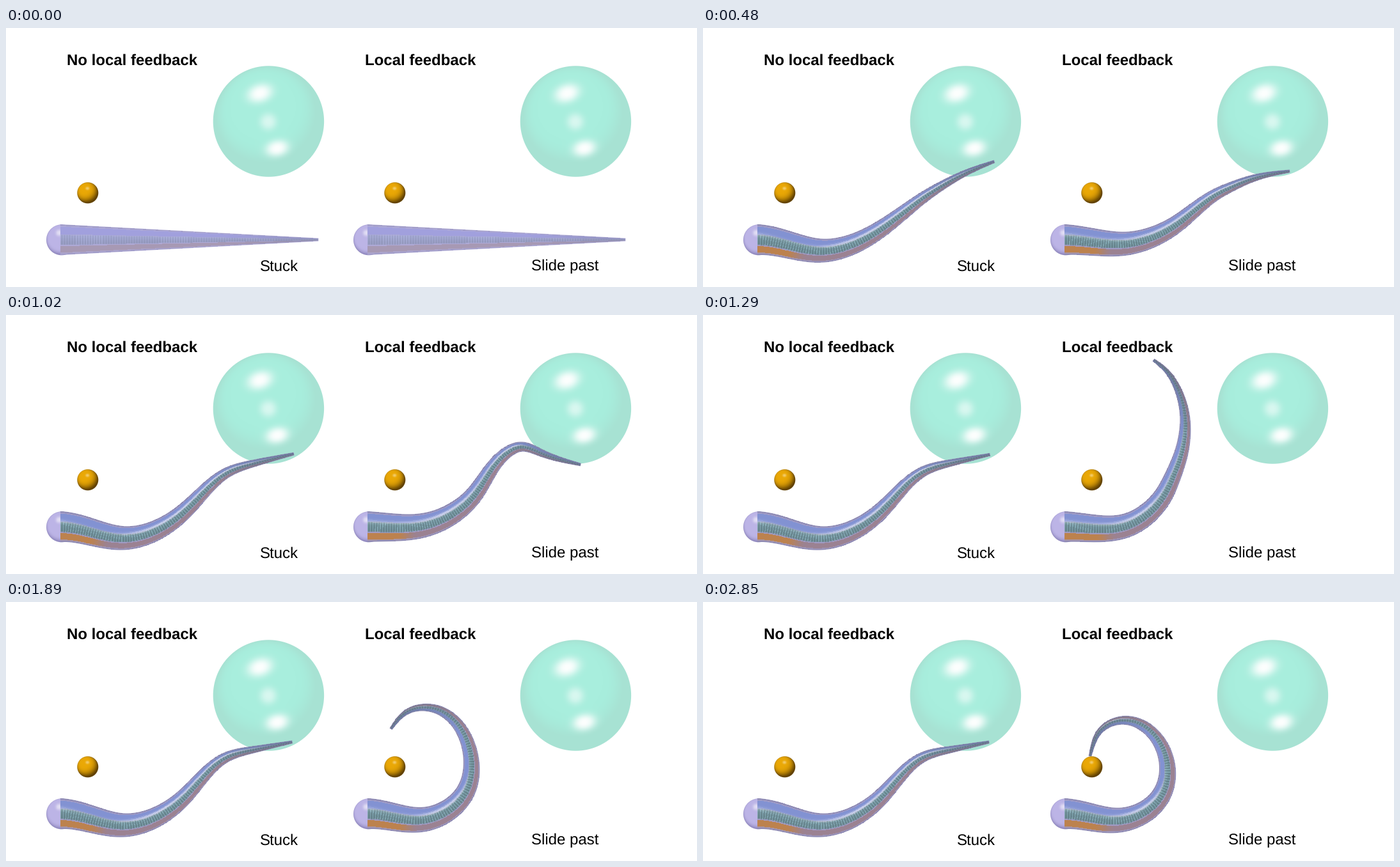
Animation of 1080x405 px, one loop 2.91 s. Source, as a matplotlib script:

```python
import numpy as np
import matplotlib.pyplot as plt
from matplotlib.animation import FuncAnimation

plt.rcParams["text.hinting"] = "none"

W, H, DPI = 1080, 405, 100
FRAMES, STEP = 97, 30
LAST = 79
PANEL = 480          # distance between the two panels
N, M = 300, 28       # cells along and across an arm
R_BASE, R_TIP = 23.7, 2
ROOT = (85, 331)
SETTLE = 10          # time constant of the slow approach

# a few points of the centre line at key steps; every arm starts at ROOT
STRAIGHT = [(290, 331), (488, 331)]
STUCK = {
    0: STRAIGHT,
    8: [(182, 347), (300, 308), (365, 270), (415, 236), (461, 214)],
    LAST: [(182, 349), (275, 308), (345, 242), (385, 231), (447, 219)],
}
SLIDE = {
    0: STRAIGHT,
    8: [(172, 343), (290, 305), (350, 268), (385, 248), (429, 229)],
    18: [(175, 331), (258, 294), (318, 239), (350, 228), (441, 231)],
    28: [(172, 329), (250, 283), (298, 219), (325, 206), (355, 215), (418, 234)],
    30: [(185, 322), (265, 240), (330, 125), (352, 75)],
    43: [(175, 338), (240, 290), (251, 240), (221, 149), (168, 127), (144, 134)],
    LAST: [(172, 341), (233, 307), (246, 266), (213, 197), (176, 185),
           (142, 200), (125, 241)],
}


def spline(p, count):
    """Cubic spline through p, level at the root and free at the tip."""
    u = np.r_[0, np.cumsum(np.hypot(*np.diff(p, axis=0).T))]
    h = np.diff(u)
    d = np.diff(p, axis=0) / h[:, None]
    k = len(u)
    a, b = np.eye(k), np.zeros((k, 2))
    a[0, :2] = 2 * h[0], h[0]
    b[0] = 6 * (d[0] - (1, 0))
    for i in range(1, k - 1):
        a[i, i - 1:i + 2] = h[i - 1], 2 * (h[i - 1] + h[i]), h[i]
        b[i] = 6 * (d[i] - d[i - 1])
    m = np.linalg.solve(a, b)
    x = np.linspace(0, u[-1], count)
    j = np.clip(np.searchsorted(u, x, "right") - 1, 0, k - 2)
    g = h[j][:, None]
    lo, hi = (u[j + 1] - x)[:, None], (x - u[j])[:, None]
    return ((m[j] * lo**3 + m[j + 1] * hi**3) / (6 * g)
            + (p[j] / g - m[j] * g / 6) * lo
            + (p[j + 1] / g - m[j + 1] * g / 6) * hi)


def encode(pts):
    """Pose as the angle of every segment, followed by the length."""
    c = spline(np.array([ROOT] + pts, float), 1200)
    s = np.r_[0, np.cumsum(np.hypot(*np.diff(c, axis=0).T))]
    q = np.linspace(0, s[-1], N + 1)
    x, y = np.interp(q, s, c[:, 0]), np.interp(q, s, c[:, 1])
    return np.r_[np.unwrap(np.arctan2(np.diff(y), np.diff(x))), s[-1]]


class Motion:
    """Monotone cubic between key poses, in a time that slows after settle."""

    def __init__(self, poses, settle):
        self.settle = settle
        self.k = np.array([self.warp(t) for t in poses])
        self.v = np.array([encode(p) for p in poses.values()])
        d = np.diff(self.v, axis=0) / np.diff(self.k)[:, None]
        a, b = d[:-1], d[1:]
        same = a * b > 0
        mid = np.where(same, 2 * a * b / np.where(same, a + b, 1), 0)
        self.m = np.vstack([d[:1], mid, d[-1:]])

    def warp(self, t):
        late = max(t - self.settle, 0)
        return min(t, self.settle) + SETTLE * (1 - np.exp(-late / SETTLE))

    def at(self, t):
        k, v, m = self.k, self.v, self.m
        t = self.warp(t)
        j = min(np.searchsorted(k, t, "right") - 1, len(k) - 2)
        h = k[j + 1] - k[j]
        u = (t - k[j]) / h
        e = u * u * (3 - 2 * u)
        return (v[j] * (1 - e) + v[j + 1] * e
                + h * u * (1 - u) * (m[j] * (1 - u) - m[j + 1] * u))


def rgb(*c):
    return np.array(c) / 255


def mix(a, b, w):
    w = np.asarray(w)[..., None]
    return a * (1 - w) + b * w


def smooth(x, a, b):
    u = np.clip((x - a) / (b - a), 0, 1)
    return u * u * (3 - 2 * u)


def window(x, a, b, soft=.08):
    return smooth(x, a - soft / 2, a + soft / 2) * (1 - smooth(x, b - soft / 2, b + soft / 2))


# s runs from root to tip, v from the lower side (-1) to the upper side (1)
s = ((np.arange(N) + .5) / N)[:, None] * np.ones((1, M))
v = np.ones((N, 1)) * ((np.arange(M) + .5) / M * 2 - 1)
ring = np.cos(2 * np.pi * (np.arange(N) % 3) / 3)[:, None]


def skin(body, upper, core, lower, tip, depth):
    """Clear tube with three muscles inside, the middle one ringed."""
    col = mix(body, upper, window(v, .36, .86))
    col = mix(col, lower, window(v, -.88, -.42))
    ribs = core * (1 + .13 * v + depth * ring)[..., None]
    col = mix(col, ribs, window(v, -.34, .32))
    col = mix(col, body * .88, smooth(np.abs(v), .88, 1))
    return np.clip(mix(col, tip, .65 * smooth(s, .6, 1)), 0, 1)


rest_col = skin(rgb(174, 170, 216), rgb(161, 160, 221), rgb(156, 161, 200),
                rgb(167, 153, 180), rgb(140, 142, 178), .05)
flex = mix(rgb(155, 130, 146), rgb(188, 130, 78), 1 - smooth(s, .12, .2))
flex_col = skin(rgb(160, 156, 200), rgb(130, 146, 210), rgb(114, 146, 156),
                flex, rgb(96, 108, 132), .14)


def gloss(angle):
    """Light from the upper left, as a streak along the lit side."""
    facing = np.cos(-angle - np.radians(35))[:, None]
    return .6 * facing**4 * np.exp(-((v - .42 * facing) / .13)**2) * (1 - smooth(s, .75, 1))


fig = plt.figure(figsize=(W / DPI, H / DPI), dpi=DPI, facecolor="white")
ax = fig.add_axes([0, 0, 1, 1])
ax.set_xlim(0, W)
ax.set_ylim(H, 0)
ax.axis("off")


def ball(cx, cy, r, light, dark, lit, span, glints, z):
    """Shaded ball; glints are (dx, dy, rx, ry, turn, strength)."""
    h = int(r) + 3
    left, top = int(cx) - h, int(cy) - h
    c = np.arange(2 * h) + .5
    x, y = np.meshgrid(c + left - cx, c + top - cy)
    d = np.hypot(x, y)
    nz = np.sqrt(np.clip(1 - (d / r)**2, 0, 1))
    lam = (x * lit[0] + y * lit[1]) / r + nz * lit[2]
    col = mix(rgb(*dark), rgb(*light), smooth(lam, *span))
    for dx, dy, rx, ry, turn, amount in glints:
        a = np.radians(turn)
        p = (x - dx) * np.cos(a) + (y - dy) * np.sin(a)
        q = (y - dy) * np.cos(a) - (x - dx) * np.sin(a)
        col = mix(col, np.ones(3), amount * np.exp(-np.hypot(p / rx, q / ry)**2.6))
    ax.imshow(np.dstack([col, np.clip(r - d + .5, 0, 1)]), aspect="auto", zorder=z,
              extent=(left, left + 2 * h, top + 2 * h, top), interpolation="nearest")


across = np.linspace(-1, 1, M + 1)
radius = np.linspace(R_BASE, R_TIP, N + 1)


class Arm:
    def __init__(self, poses, settle, dx):
        self.motion, self.dx, self.mesh = Motion(poses, settle), dx, None
        self.rim, = ax.plot([], [], lw=.6, alpha=.8, zorder=4)

    def draw(self, t):
        state = self.motion.at(t)
        angle, seg = state[:N], state[N] / N
        x = ROOT[0] + self.dx + np.r_[0, np.cumsum(np.cos(angle))] * seg
        y = ROOT[1] + np.r_[0, np.cumsum(np.sin(angle))] * seg
        node = np.r_[angle[0], (angle[1:] + angle[:-1]) / 2, angle[-1]]
        gx = x[:, None] + (np.sin(node) * radius)[:, None] * across
        gy = y[:, None] - (np.cos(node) * radius)[:, None] * across
        w = min(t / 4, 1)
        col = rest_col * (1 - w) + flex_col * w
        col = mix(col, np.ones(3), w * gloss(angle))
        if self.mesh is not None:
            self.mesh.remove()
        self.mesh = ax.pcolormesh(gx, gy, col, shading="flat", zorder=3)
        self.rim.set_data(np.r_[gx[:, 0], gx[::-1, -1]],
                          np.r_[gy[:, 0], gy[::-1, -1]])
        self.rim.set_color(rgb(172, 167, 214) * (1 - w) + rgb(138, 134, 178) * w)


for dx in (0, PANEL):
    ball(410.4 + dx, 146, 86.7, (168, 238, 221), (167, 226, 211),
         (-.12, -.3, .94), (.35, .8),
         [(-13.5, -44, 20, 14, -18, .97), (-.5, .5, 13, 13, 0, .55),
          (13.5, 42, 18, 12.5, -12, .97)], 1)
    ball(127.8 + dx, 257.8, 16.5, (234, 168, 6), (98, 66, 2),
         (-.3, -.4, .86), (-.1, .95), [(-.5, -7, 3, 2.5, 0, .4)], 5)
    ball(87 + dx, 331.3, 24, (188, 180, 230), (146, 138, 192),
         (-.1, -.25, .95), (0, .65), [(-4, -11, 5, 5, 0, .55)], 2)

arms = [Arm(STUCK, 8, 0), Arm(SLIDE, 33, PANEL)]

for x, y, label, weight in ((94.6, 58, "No local feedback", "bold"),
                            (561.4, 58, "Local feedback", "bold"),
                            (396.8, 379.5, "Stuck", "normal"),
                            (820.6, 379.5, "Slide past", "normal")):
    ax.text(x, y, label, family="Liberation Sans", weight=weight,
            size=24 * 72 / DPI, color="black", va="baseline", zorder=6)


def draw(i):
    # five poses per six ticks: the first of each group is held twice
    t = min(5 * (i // 6) + max(0, i % 6 - 1), LAST)
    for arm in arms:
        arm.draw(t)
    return []


anim = FuncAnimation(fig, draw, frames=FRAMES, interval=STEP,
                     init_func=lambda: draw(0), repeat=True, repeat_delay=0, blit=False)
plt.show()
```
